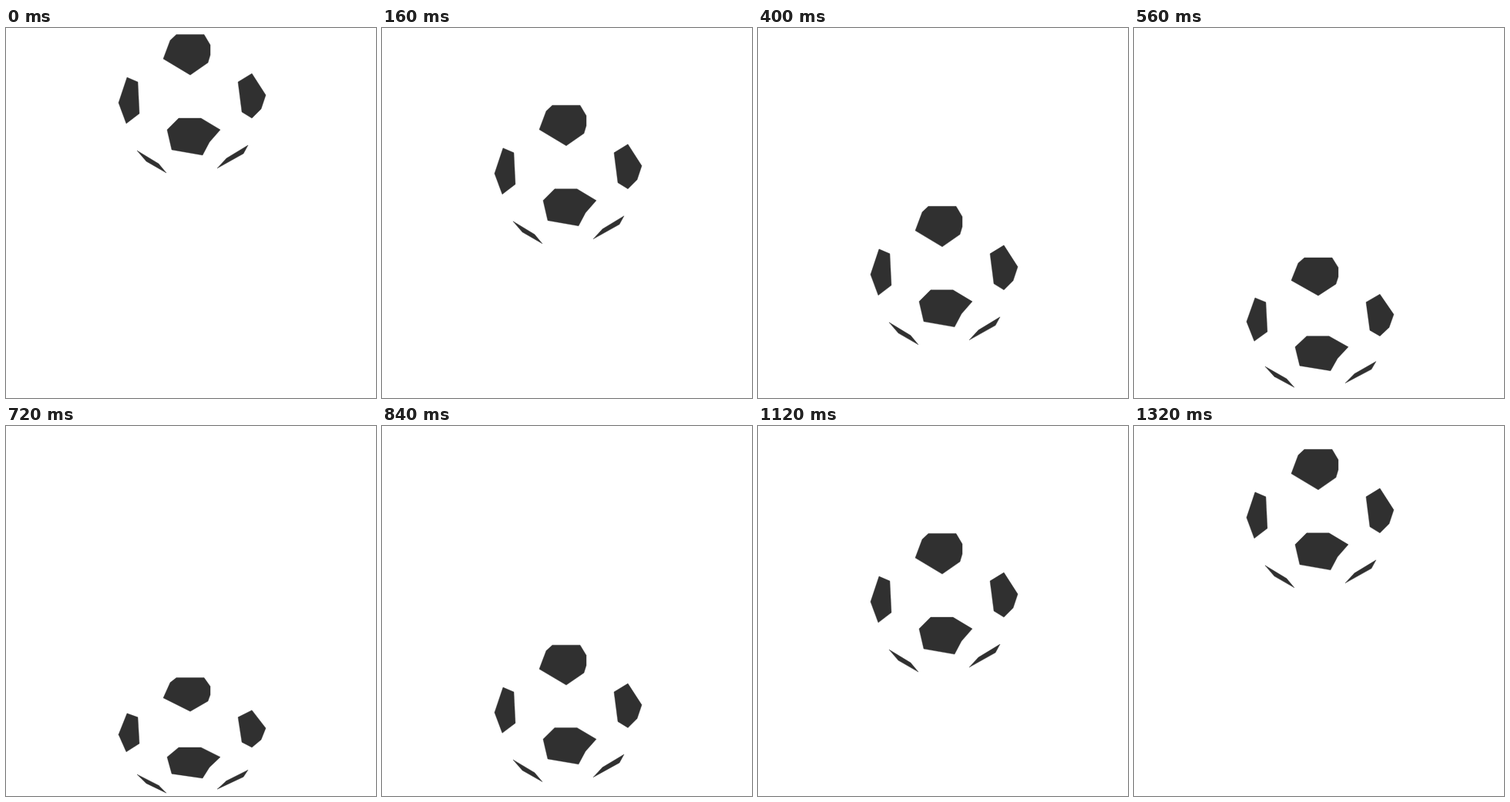
An HTML page for the animation above (1360 ms loop, 480x480 px).

```html
<!DOCTYPE html>
<html>
<head>
<meta charset="utf-8">
<style>
  html, body { margin: 0; height: 100%; overflow: hidden; background: #fff; }
  svg { display: block; width: 100%; height: 100%; }
</style>
</head>
<body>
<svg viewBox="0 0 480 480">
  <g id="ball" fill="#303030" stroke="#303030" stroke-width=".4">
    <path d="M221 8.500H257L265 22V35L262 45 239 61 204 40 213 16Z"/>
    <path d="M157 64L171 70 173 111 156 124 146 97Z"/>
    <path d="M319 59L337 87 331 105 319 117 306 109 301 70Z"/>
    <path d="M224 117H253L278 132 264 148 255 165 215 158 209 132Z"/>
    <path d="M170 159L198 176 208 188 182 173Z"/>
    <path d="M314 152L308 163 274 182 286 169Z"/>
  </g>
</svg>
<script>
const ball = document.getElementById('ball');
const STEP = 40, STEPS = 34;
const SPEED = 21.85;         // pixels per step
const LOWEST = 16.9;         // step at the middle of the bounce
const CONTACT = 4.63;        // steps between touching the ground and LOWEST
const SQUASH_STEPS = 3.5;    // then the ball stays flat until it springs back

function pose(step) {
  const away = Math.abs(step - LOWEST);
  const drop = SPEED * (STEPS - LOWEST - Math.max(away, CONTACT));
  const progress = (CONTACT - away) / SQUASH_STEPS;
  const squash = Math.min(1, Math.max(0, progress)) ** 1.4;
  return { y: drop + 47 * squash, scale: 1 - squash / 6 };
}

function draw() {
  const elapsed = Math.floor(performance.now() / STEP);
  const step = elapsed % STEPS || STEPS;   // the loop opens at the top of the rise
  const { y, scale } = pose(step);
  ball.setAttribute('transform', `translate(0 ${y}) scale(1 ${scale})`);
  requestAnimationFrame(draw);
}
draw();
</script>
</body>
</html>
```
